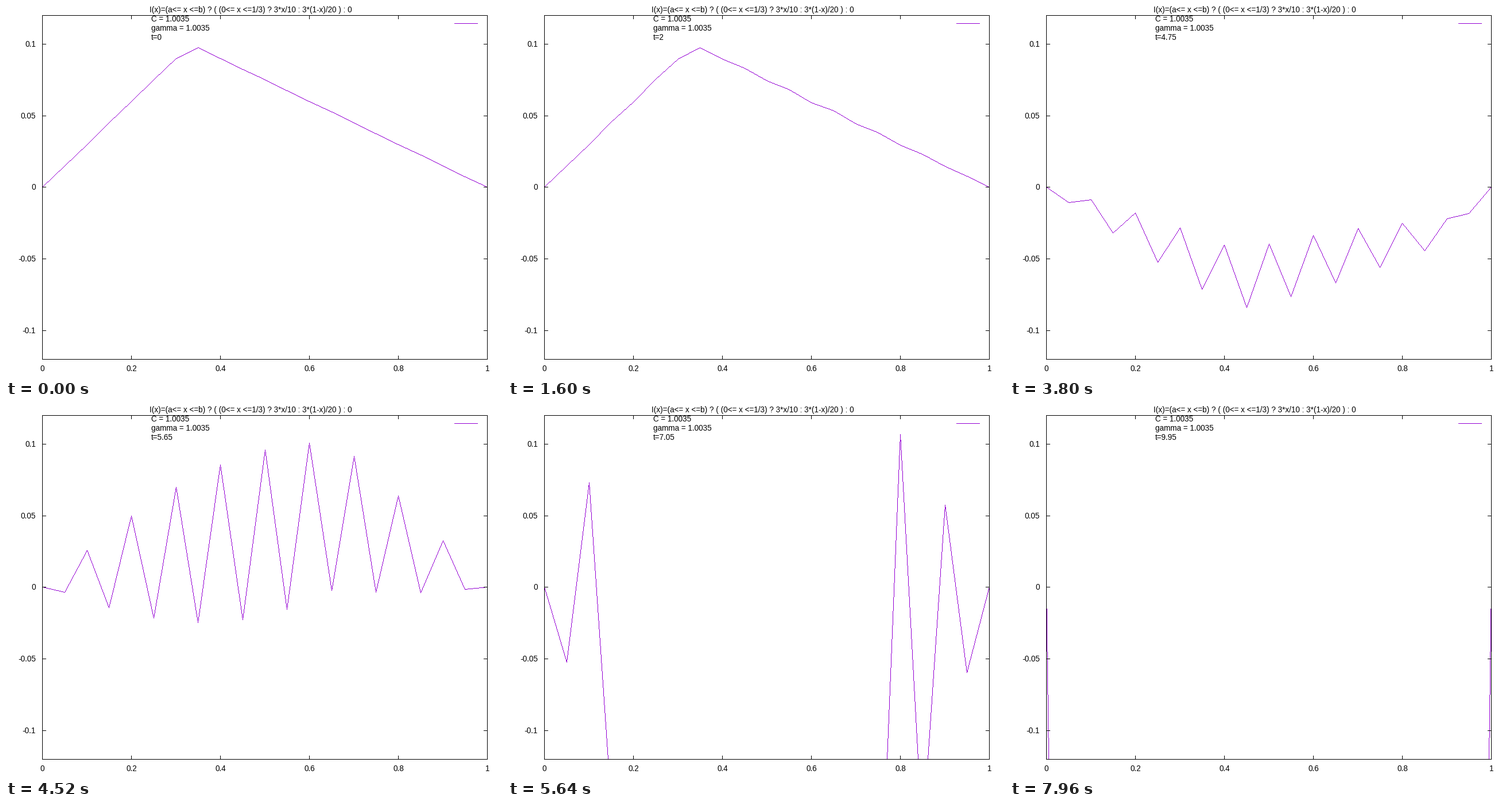
A matplotlib script for the animation above (8000 ms loop, 864 by 648 pixels).

```python
import numpy as np
import matplotlib.pyplot as plt
from matplotlib.animation import FuncAnimation

W, H = 864, 648
LEFT, RIGHT, TOP, BOTTOM = 63, 838, 16, 615
Y_MAX = 0.12
CELLS, STEPS, DT = 20, 200, 0.05
GAMMA = 1.0035
PURPLE = "#9400d3"

plt.rcParams.update({
    "font.family": "Liberation Sans",
    "font.size": 13.55,
    "path.simplify": False,
    "path.snap": False,
    "toolbar": "None",
})


def nearest(v):
    return np.floor(v + 0.5)


def px(x):
    return nearest(LEFT + (RIGHT - LEFT) * x)


def py(y):
    return BOTTOM - nearest((BOTTOM - TOP) * (y + Y_MAX) / (2 * Y_MAX))


def start_shape(x):
    return np.where(x <= 1 / 3, 3 * x / 10, 3 * (1 - x) / 20)


def solve_wave():
    """Explicit scheme for a fixed string, just past its stability limit."""
    g2 = GAMMA ** 2
    u = np.zeros((STEPS, CELLS + 1))
    u[0] = start_shape(grid)
    u[0, [0, -1]] = 0
    for n in range(STEPS - 1):
        mid = u[n, 1:-1]
        step = 2 * (1 - g2) * mid + g2 * (u[n, 2:] + u[n, :-2])
        u[n + 1, 1:-1] = step / 2 if n == 0 else step - u[n - 1, 1:-1]
    return u


def segments(u):
    """Pixel end points; segments with both ends out of range are left out."""
    for x0, y0, x1, y1 in zip(grid[:-1], u[:-1], grid[1:], u[1:]):
        out0, out1 = abs(y0) > Y_MAX, abs(y1) > Y_MAX
        if out0 and out1:
            continue
        if out0 or out1:
            edge = np.copysign(Y_MAX, y0 if out0 else y1)
            cross = x0 + (x1 - x0) * (edge - y0) / (y1 - y0)
            if out0:
                x0, y0 = cross, edge
            else:
                x1, y1 = cross, edge
        yield px(x0), py(y0), px(x1), py(y1)


def pixel_line(u):
    """The curve as one-pixel dashes, giving hard steps without smoothing."""
    xs, ys = [], []
    for x0, y0, x1, y1 in segments(u):
        count = int(max(abs(x1 - x0), abs(y1 - y0))) + 1
        xs.append(nearest(np.linspace(x0, x1, count)))
        ys.append(nearest(np.linspace(y0, y1, count)))
    x, y = np.concatenate(xs), np.concatenate(ys) + 0.5
    gap = np.full_like(x, np.nan)
    return np.column_stack([x, x + 1, gap]).ravel(), np.repeat(y, 3)


def rule(x0, y0, x1, y1, color="black", z=5):
    """One-pixel horizontal or vertical line, both end pixels included."""
    if y0 == y1:
        xs, ys = (x0, x1 + 1), (y0 + 0.5, y0 + 0.5)
    else:
        xs, ys = (x0 + 0.5, x0 + 0.5), (y0, y1 + 1)
    ax.plot(xs, ys, color=color, lw=1, zorder=z, solid_capstyle="butt")


def label(x, y, s, ha="left"):
    return ax.text(x, y, s, ha=ha, va="baseline", color="black", zorder=1)


fig = plt.figure(figsize=(W / 72, H / 72), dpi=72, facecolor="white")
ax = fig.add_axes([0, 0, 1, 1])
ax.set_xlim(0, W)
ax.set_ylim(H, 0)
ax.axis("off")

# Frame, ticks and tick labels
for y in (TOP, BOTTOM):
    rule(LEFT, y, RIGHT, y)
for x in (LEFT, RIGHT):
    rule(x, TOP, x, BOTTOM)
TICK = 6
for v in (0, 0.2, 0.4, 0.6, 0.8, 1):
    x = px(v)
    rule(x, TOP, x, TOP + TICK)
    rule(x, BOTTOM - TICK, x, BOTTOM)
    label(x + 0.5, 636, f"{v:g}", "center")
for v in (-0.1, -0.05, 0, 0.05, 0.1):
    y = py(v)
    rule(LEFT, y, LEFT + TICK, y)
    rule(RIGHT - TICK, y, RIGHT, y)
    label(52, y + 5, f"{v:g}", "right")

# Heading, parameters and key
label(249.5, 11, "I(x)=(a<= x <=b) ? ( (0<= x <=1/3) ? 3*x/10 : 3*(1-x)/20 ) : 0")
label(253, 27, f"C = {GAMMA:g}")
label(253, 43, f"gamma = {GAMMA:g}")
clock = label(253, 59, "t=0")
rule(781, 30, 821, 30, PURPLE, 3)

grid = np.linspace(0, 1, CELLS + 1)
waves = solve_wave()
curve, = ax.plot([], [], color=PURPLE, lw=1, zorder=3, solid_capstyle="butt")


def draw(n):
    curve.set_data(*pixel_line(waves[n]))
    clock.set_text(f"t={n * DT:g}")
    return curve, clock


anim = FuncAnimation(fig, draw, frames=STEPS, interval=40, repeat=True,
                     repeat_delay=0, blit=False)
plt.show()
```
